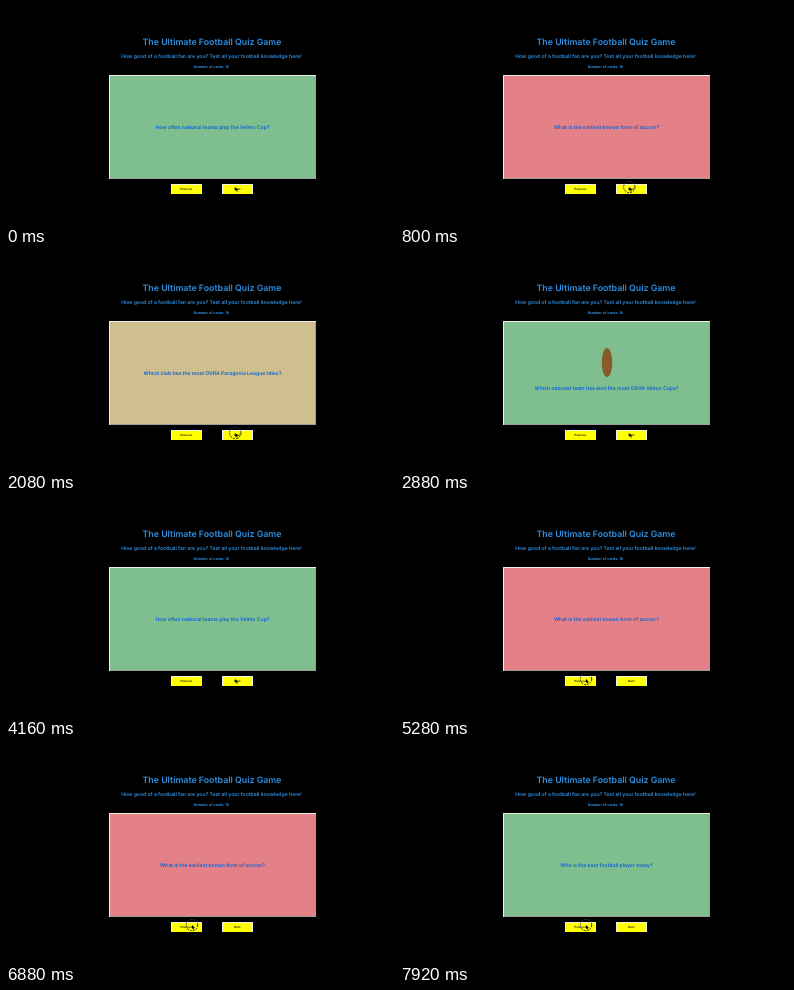
These frames come from a looping animation (388x218 px, 8 s). An HTML page:

```html
<!DOCTYPE html>
<html lang="en">
<head>
<meta charset="utf-8">
<title>Football Quiz</title>
<style>
  html, body { margin: 0; width: 100%; height: 100%; overflow: hidden; background: #000; }
  svg { display: block; width: 388px; height: 218px; }
  text { font: 600 5.1px Inter, sans-serif; text-anchor: middle; fill: #2f8fe0; text-rendering: geometricPrecision; }
  .title { font-size: 8.8px; }
  .count { font-size: 3.6px; font-weight: 700; }
  #question { fill: #0a63d8; }
  .button text { fill: #000; font-size: 2.9px; font-weight: 500; }
  .button rect { fill: #ff0; }
  .edge { fill: none; stroke: #f0f0e0; }
  .shade { fill: none; stroke: #9a9f98; }
  #ring { fill: none; stroke: #333; stroke-dasharray: 2 1; }
</style>
</head>
<body>
<svg viewBox="0 0 388 218">
  <rect width="388" height="218"/>
  <text class="title" x="206" y="38.7">The Ultimate Football Quiz Game</text>
  <text x="205.5" y="51.6">How good of a football fan are you? Test all your football knowledge here!</text>
  <text class="count" x="205.5" y="62.3">Number of cards: 10</text>
  <rect id="card" x="103" y="69" width="207" height="104"/>
  <path class="shade" d="M309.5 69V172.5H103"/>
  <path class="edge" d="M103.5 173V69.5H310"/>
  <ellipse id="cup" cx="207" cy="110.5" rx="5.3" ry="14.5" fill="#8a5a2b"/>
  <text id="question" x="206.5"></text>
  <g class="button">
    <rect x="165" y="178" width="31" height="10"/>
    <path class="edge" d="M165.5 188V178.5H195.5V188"/>
    <text x="180.3" y="184.1">Previous</text>
  </g>
  <g class="button">
    <rect x="216" y="178" width="31" height="10"/>
    <path class="edge" d="M216.5 188V178.5H246.5V188"/>
    <text x="231.3" y="184.1">Next</text>
  </g>
  <g id="pointer">
    <path d="M0 0V4L1 3.2L1.8 4.8L2.5 4.4L1.8 3H3Z"/>
    <circle id="ring" r="5.7"/>
  </g>
</svg>
<script>
const LOOP = 8000;
const GREEN = '#7fbe8f', PINK = '#e38088', TAN = '#cfbf8e';

const cards = {
  often: [GREEN, 'How often national teams play the Velmo Cup?'],
  early: [PINK, 'What is the earliest known form of soccer?'],
  best: [GREEN, 'Who is the best football player today?'],
  club: [TAN, 'Which club has the most OVRA Paragonia League titles?'],
  wins: [GREEN, 'Which national team has won the most OBVA Velmo Cups?']
};

// Press time, card change, release, card shown
const clicks = [
  [80, 160, 240, 'early'],
  [800, 960, 1120, 'best'],
  [1440, 1520, 1600, 'club'],
  [2000, 2160, 2240, 'often'],
  [2640, 2720, 2880, 'wins'],
  [3360, 3520, 3600, 'early'],
  [4000, 4080, 4160, 'often'],
  [4640, 4720, 4800, 'early'],
  [5200, 5360, 5440, 'often'],
  [5600, 5760, 5840, 'early'],
  [6000, 6160, 6320, 'club'],
  [6720, 6880, 7040, 'early'],
  [7200, 7360, 7520, 'best'],
  [7920, LOOP, LOOP, 'often']
];

// Start time, x, y
const stops = [[0, 229.3, 181], [5040, 152.5, 122.5], [5200, 186, 181]];

const [card, cup, question, pointer, ring] =
  ['card', 'cup', 'question', 'pointer', 'ring'].map(id => document.getElementById(id));
const show = (el, on) => el.setAttribute('visibility', on ? 'visible' : 'hidden');
let current;

function setCard(name) {
  if (name === current) return;
  current = name;
  const [color, label] = cards[name];
  const hasCup = name === 'wins';
  card.setAttribute('fill', color);
  question.textContent = label;
  question.setAttribute('y', hasCup ? 137.9 : 123);
  show(cup, hasCup);
}

function draw(now) {
  const t = now % LOOP;
  let name = 'often', pressed = false;
  for (const [down, change, up, next] of clicks) {
    if (t >= change) name = next;
    if (t >= down && t < up) pressed = true;
  }
  setCard(name);
  show(ring, pressed);
  const [, x, y] = stops.findLast(([from]) => t >= from);
  pointer.setAttribute('transform', `translate(${x} ${y})`);
}

const start = performance.now();
function tick() {
  draw(performance.now() - start);
  requestAnimationFrame(tick);
}
tick();
</script>
</body>
</html>
```
